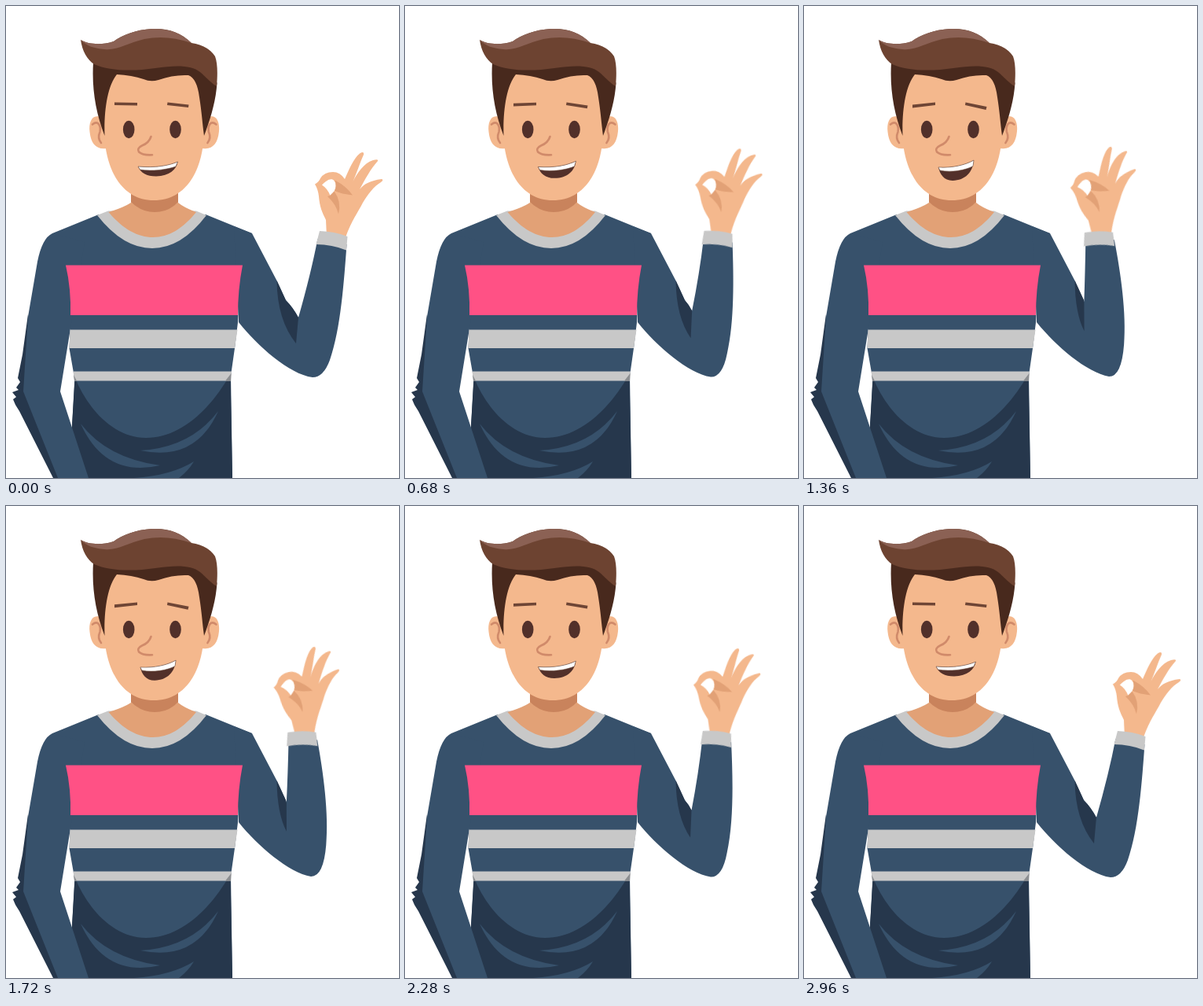
Write an HTML page that moves like this. It is 500 px wide and 600 px high and loops after 3000 ms.

```html
<!DOCTYPE html>
<html lang="en">
<head>
<meta charset="utf-8">
<title>Waving man</title>
<style>
  html, body { margin: 0; width: 100%; height: 100%; overflow: hidden; background: #fff; }
  svg { display: block; width: 500px; height: 600px; }

  .skin { fill: #f4b88d; }
  .tan { fill: #e2a176; }
  .navy { fill: #37516b; }
  .shade { fill: #26374c; }
  .grey { fill: #c8c8c8; }
  .pink { fill: #ff5185; }
  .corner { fill: #8c8e91; }
  .brown { fill: #52302a; }
  .line { fill: none; stroke: #d08a6a; stroke-width: 2.6; stroke-linecap: round; }
  .brow { fill: #6e4535; }

  /* Half a sine wave each way: 3 s for the full swing */
  .move {
    animation: 1.5s cubic-bezier(.364, 0, .636, 1) infinite alternate;
  }
  .hand { transform-origin: 388px 490px; animation-name: swing; }
  .sleeve { animation-name: sleeve; }
  .fold { animation-name: fold; }
  .mouth { animation-name: mouth; }
  .teeth { animation-name: teeth; }
  .left { animation-name: left; }
  .right { animation-name: right; }

  @keyframes swing {
    from { transform: rotate(0deg); }
    to { transform: rotate(-12.1deg); }
  }
  /* The sleeve reaches under the cuff so no gap opens between them */
  @keyframes sleeve {
    from { d: path("M290 280 L313 289 L345 350 L356 374 Q365 383 372 396 Q388 340 396.500 296 L433.500 303 C430 350 426 410 412 450 Q404 472 390 472 C360 468 320 432 296 402 Z"); }
    to { d: path("M290 280 L313 289 L345 350 L356 374 Q356 375 356 376 Q357 340 357.500 297 L394 297 C402.500 340 410 390 407 430 Q404 471 388 471 C360 466 320 432 296 402 Z"); }
  }
  @keyframes fold {
    from { d: path("M344.500 349 L356 374 Q365 383 372 396 L369 429 Q345 399 344.500 349 Z"); }
    to { d: path("M344.500 349 L356 374 Q356 375 356 376 L356.300 413 Q345 391 344.500 349 Z"); }
  }
  @keyframes mouth {
    from { d: path("M168 204 C190 206 207 203 218.500 198 C217 208 208 216 191 216.500 C179 216.500 171 212 168 204 Z"); }
    to { d: path("M171 205 C190 206 205 202 216 196 C215 211 205 222 189 222 C178 222 173 214 171 205 Z"); }
  }
  @keyframes teeth {
    from { d: path("M168 204 C190 206 207 203 218.500 198 L216 204 C205 208 186 210.500 170.500 208 Z"); }
    to { d: path("M171 205 C190 206 205 202 216 196 L215 203.500 C205 209 188 212 173 209 Z"); }
  }
  @keyframes left {
    from { d: path("M138 122.500 L167 123 L167 126.500 L138 126 Z"); }
    to { d: path("M138 125.500 L167 122.500 L167 126 L138 129.500 Z"); }
  }
  @keyframes right {
    from { d: path("M205.500 122.500 L232.500 125.500 L232 129 L205 126 Z"); }
    to { d: path("M205.500 122.500 L232.500 128 L231.500 132 L205 126 Z"); }
  }
</style>
</head>
<body>
<svg viewBox="0 0 500 600" aria-label="Smiling man making an OK sign">
  <!-- torso -->
  <path class="navy" d="M59 289 L118 265 H254 L313 289 L301 330 Q295 360 295 402 L291 435 L286 470 L288 600 H84 V535 L87.500 475 L80.500 435 L82 405 L50 340 Z"/>
  <path class="shade" d="M87.500 472 C105 515 139 549 178 549 C220 549 258 516 285.500 468 L288 600 H84 V533 Z"/>
  <g class="navy">
    <path d="M95 531 Q129 575 196 584 Q126 600 95 531 Z"/>
    <path d="M171 565 Q235 561 270 515 Q241 580 171 565 Z"/>
    <path d="M163 600 Q210 597 239 579 Q232 591 220 600 Z"/>
  </g>

  <!-- resting arm -->
  <path class="shade" d="M28 392 L21 443 L15 473 L18 478 L13 485 L16 488 L8 491 L13 497 L9 500 L12 507 L17 515 L60 600 H80 L40 480 Z"/>
  <path class="navy" d="M59 289 Q46 295 40 325 L28 395 L22 490 L66 600 H105 L69 490 L82 410 L100 300 Z"/>

  <!-- neck and collar -->
  <path class="grey" d="M116 266 L130 260.500 H242 L255 266 Q223 308 186 308 Q149 308 116 266 Z"/>
  <path class="tan" d="M159 235 V250 Q150 256 130.500 262 C149 284 168 294 187 294 C207 294 225 283 242 262 Q226 256 219 250 V235 Z"/>
  <path fill="#c9835c" d="M159 235 V249 Q172 262 189 262 Q207 262 219 249 V235 Z"/>

  <!-- head -->
  <defs>
    <g id="ear">
      <path class="skin" d="M122 142 C110 136 105 147 106.500 160 C108 175 115 183 128 181 V142 Z"/>
      <path class="line" d="M110 150.500 C117 145 121 152 119.500 160 Q116 168 121 174"/>
    </g>
  </defs>
  <use href="#ear"/>
  <use href="#ear" transform="matrix(-1 0 0 1 377.400 0)"/>
  <path class="skin" d="M125 110 V160 C126 206 146 247 188 247 C231 247 251 206 252 160 V85 H135 Z"/>
  <path fill="#48291d" d="M111 72 C109 105 114 135 125.500 165 C124.500 133 129 102 141 87 Q160 88 175 93 Q184 97 194 94 Q213 87 232 88 Q243 92 246 116 C249 135 250 150 252 165 C261 141 267 120 268.500 98 L255 60 H130 Z"/>
  <path fill="#6d4331" d="M95 43 C97 57 103 68 112 74 C132 83 162 83 190 79 C216 75 236 75 247 84 C257 93 261 98 268 102 C269.500 85 269 72 266 64 C259 53 248 49 236 47 C222 33 205 28 186 29 C165 30 148 37 137 45 C122 50 105 49 95 43 Z"/>
  <path fill="#8b6154" d="M95 43 C105 49 122 50 137 45 C148 37 165 30 186 29 C206 28 223 34 236 47 C215 40 196 38 176 42 C154 47 142 57 125 55 C113 54 102 51 95 43 Z"/>

  <!-- face -->
  <path class="brow move left"/>
  <path class="brow move right"/>
  <ellipse class="brown" cx="156.200" cy="157" rx="7.300" ry="11.200"/>
  <ellipse class="brown" cx="215.500" cy="157" rx="7.300" ry="11.200"/>
  <path class="line" stroke-linejoin="round" d="M184.500 166 Q182 174 173 177.500 Q166 181 169 185.500 Q174 190 186 189.300"/>
  <path class="brown move mouth"/>
  <path class="move teeth" fill="#fff" stroke="#6b4a3c" stroke-width=".6"/>

  <!-- waving arm -->
  <path class="navy move sleeve"/>
  <path class="shade move fold"/>
  <g class="move hand">
    <path class="skin" fill-rule="evenodd" d="M408 294 L407 272 C402 262 399 255 398 242 Q397 233 393 226.500 Q398 224 400 219 Q405 211 416 211 Q425 211 431 220 C436 209 442 194 450 187.500 Q456 184 455 189 C450 200 446 213 441.500 223 C447 212 455 200 467 196 Q474 194 473 197 C464 207 457 220 450 233 C456 226 463 222 478 220 Q481 221 477 224 C468 229 460 240 454 250 C448 262 440 272 432 294 Z
      M402 227.500 C407 222 413 218 417 221.500 Q421 226 419 232 Q417 238 412.500 241 Q409 232 402 227.500 Z"/>
    <path class="tan" d="M412 241 L417.500 235.500 Q427 248 423 264.500 Q420 252 409 242 Z M418.500 221.500 Q433 229 441 240.500 Q427 239 418 235 Q421 229 418.500 221.500 Z"/>
    <path class="grey" d="M399 286 Q418 286.500 434.500 293 L433 310.500 Q415 303 394.500 303 Z"/>
  </g>

  <!-- stripes across the chest -->
  <path class="pink" d="M76 329.500 H301 Q295 360 295 393 H82 Q83 360 76 329.500 Z"/>
  <path class="grey" d="M81.500 411.500 H294.500 L291 435 H80.500 Z"/>
  <path class="grey" d="M85.500 464.500 H287 L286 476.500 H87 Z"/>
  <path class="corner" d="M86 469 L90 476.500 H87 Z M286.500 467 L279 476.500 H286 Z"/>
</svg>
</body>
</html>
```
